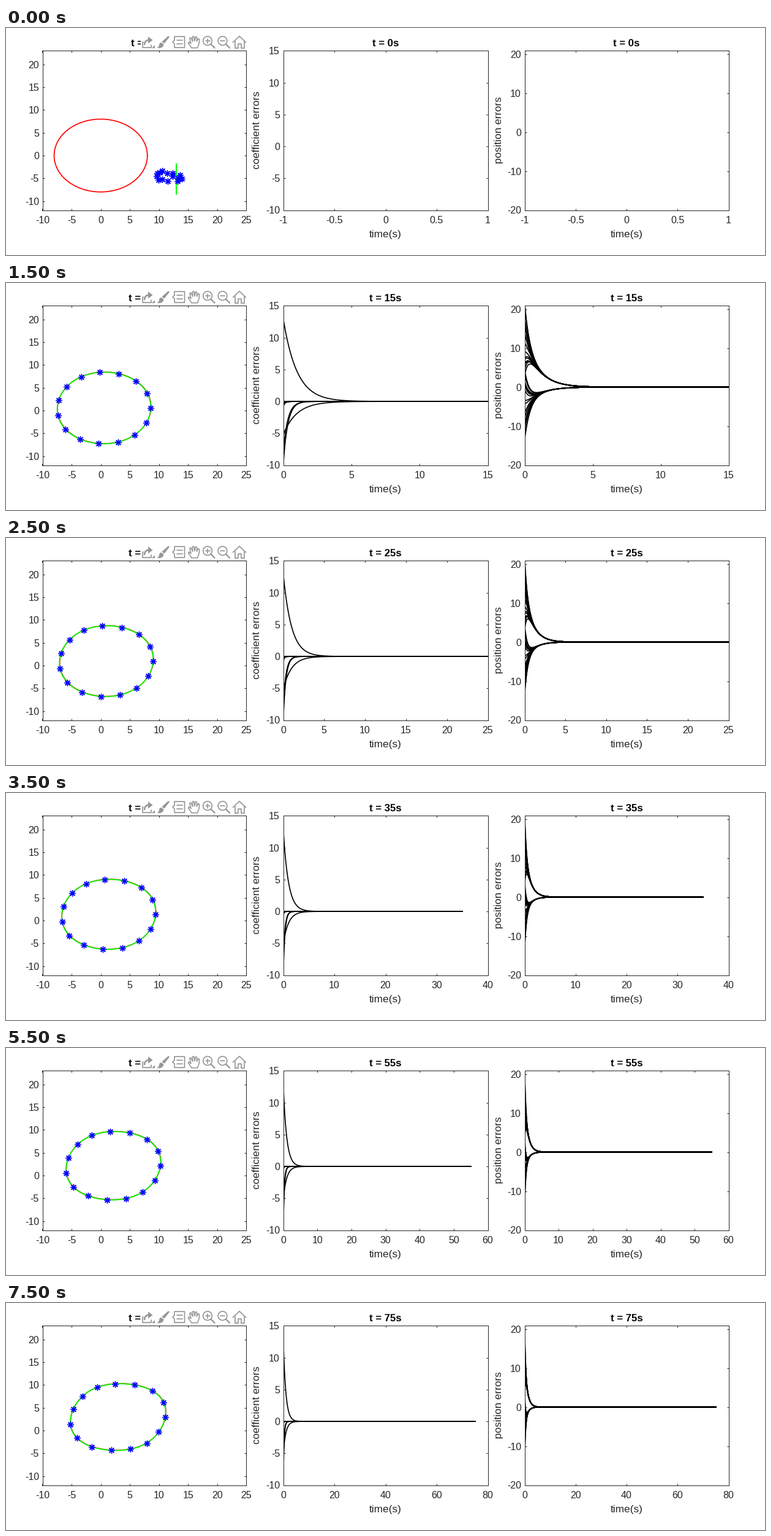
A matplotlib script that plays this animation: 1239 by 372 pixels, repeating every 8 s.

```python
import numpy as np
import matplotlib.pyplot as plt
from matplotlib.animation import FuncAnimation
from matplotlib.patches import Circle, Polygon, Rectangle

W, H, DPI = 1239, 372, 100
PX = 72 / DPI
GREY, INK = "#969696", "#262626"

plt.rcParams.update({
    "font.family": "Liberation Sans",
    "axes.unicode_minus": False,
    "axes.edgecolor": INK,
    "axes.linewidth": 1 * PX,
})

fig = plt.figure(figsize=(W / DPI, H / DPI), dpi=DPI, facecolor="white")


def panel(left, right, ylim, yticks):
    top, bottom = 37.5, 298.5
    ax = fig.add_axes([left / W, 1 - bottom / H, (right - left) / W, (bottom - top) / H])
    ax.patch.set_visible(False)
    ax.set_ylim(ylim)
    ax.set_yticks(yticks)
    ax.tick_params(direction="in", top=True, right=True, length=3.4 * PX,
                   width=1 * PX, color=INK, labelcolor=INK, labelsize=16 * PX)
    ax.tick_params(axis="x", pad=9.5 * PX)
    ax.tick_params(axis="y", pad=5.5 * PX)
    return ax


def set_time_axis(ax, lo, hi, step):
    ticks = np.arange(lo, hi + step / 2, step)
    ax.set_xlim(lo, hi)
    ax.set_xticks(ticks, [f"{v:g}" for v in ticks])


scene = panel(59.5, 392.5, (-12, 23), range(-10, 21, 5))
scene.set_xlim(-10, 25)
scene.set_xticks(range(-10, 26, 5))
coef = panel(452.5, 786.5, (-10, 15), range(-10, 16, 5))
pos = panel(846.5, 1179.5, (-20, 20.8), range(-20, 21, 10))

# Pixel-space layer for labels and the toolbar
ui = fig.add_axes([0, 0, 1, 1], zorder=5)
ui.set_xlim(0, W)
ui.set_ylim(H, 0)
ui.axis("off")


def label(x, y, text, **kw):
    return ui.text(x, y, text, fontsize=17.2 * PX, color=INK, ha="center", **kw)


titles = [ui.text(x, 30, "", fontsize=16.8 * PX, weight="bold", ha="center", zorder=1)
          for x in (226, 619.5, 1013)]
for x in (619.5, 1013):
    label(x, 343, "time(s)", va="baseline")
label(409.5, 167.5, "coefficient errors", rotation=90, va="center")
label(804, 167.5, "position errors", rotation=90, va="center")


def stroke(points, width=1.7):
    x, y = zip(*points)
    ui.plot(x, y, color=GREY, lw=width * PX, zorder=3,
            solid_joinstyle="round", solid_capstyle="round")


def fill(points):
    ui.add_patch(Polygon(points, fc=GREY, ec="none", zorder=3))


def magnifier(x, plus):
    ui.add_patch(Circle((x, 21), 7.3, fc="none", ec=GREY, lw=1.7 * PX, zorder=3))
    stroke([(x + 5.5, 26.5), (x + 11.5, 32.5)], 2.3)
    stroke([(x - 3.5, 21), (x + 3.5, 21)])
    if plus:
        stroke([(x, 17.5), (x, 24.5)])


def toolbar():
    ui.add_patch(Rectangle((220, 11), 173, 25, fc="white", ec="none", zorder=2))
    # export
    stroke([(224, 23), (222.5, 23), (222.5, 32), (236.5, 32), (236.5, 28)])
    stroke([(226, 27), (227, 23), (229.5, 20.5), (233, 19.5)], 2.6)
    fill([(232, 14), (239.5, 19.8), (232, 25.5)])
    fill([(237.5, 32.5), (242.5, 32.5), (242.5, 27.5)])
    # brush
    fill([(265, 13), (267, 14.5), (258.5, 25.5), (254.5, 22.5)])
    fill([(253.5, 23.5), (257.5, 27), (256, 31), (251.5, 33), (246.5, 32.5),
          (249.5, 30), (250.5, 25.5)])
    # data tip
    stroke([(275, 20), (275, 14), (291.5, 14), (291.5, 32), (275, 32), (275, 26),
            (272, 23), (275, 20)])
    for y in (20, 26):
        stroke([(279, y), (288, y)])
    # hand
    stroke([(303, 32.5), (297.5, 24.5), (298.5, 22.8), (302, 25.5), (299.8, 17),
            (301.5, 15.8), (304.8, 22), (304.2, 14.5), (306.5, 13.5), (308, 21.5),
            (309.3, 14.5), (311.5, 14.8), (311.5, 22), (313.8, 17.5), (315.8, 18.5),
            (315, 26), (312.5, 32.5), (303, 32.5)], 1.6)
    magnifier(329, True)
    magnifier(353.5, False)
    # home
    stroke([(370.5, 23.5), (381, 13.5), (391.5, 23.5)])
    stroke([(373.5, 22), (373.5, 32.5), (378.5, 32.5), (378.5, 25.5), (383.5, 25.5),
            (383.5, 32.5), (388.5, 32.5), (388.5, 22)])


toolbar()

ring = np.linspace(0, 2 * np.pi, 241)
theta = np.arange(15) * 2 * np.pi / 15

# Starting places of the agents
start_x = np.array([13.6, 13.25, 12.35, 11.5, 13.15, 12.35, 10.6, 13.6, 13.9, 11.4,
                    9.95, 10.6, 9.7, 9.6, 10.1])
start_y = np.array([-4.35, -4.9, -4.5, -5.65, -5.6, -3.85, -5.2, -5.15, -5.05, -3.85,
                    -5.35, -3.3, -3.95, -4.6, -3.7])

DRIFT, SHAPE_RATE, AGENT_RATE = 0.04, 3.0, 4.0


def goal(t, a):
    """Drifting circle that slowly skews."""
    s = t / 75
    bump = 0.2 * s * np.sin(3 * a)
    x = DRIFT * t + (8 + 0.1 * s) * np.cos(a) + 0.53 * s * np.sin(a) + bump
    y = DRIFT * t + (8 - 0.47 * s) * np.sin(a) + bump
    return x, y


def estimate_error(t, a):
    slow, fast = np.exp(-t), np.exp(-SHAPE_RATE * t)
    lag = DRIFT * (1 - slow)
    ex = 13 * slow - 8 * fast * np.cos(a) - lag
    ey = -5.2 * slow + fast * (1.3 * np.sin(3 * a) - 10 * np.sin(a)) - lag
    return ex, ey


def agent_error(t, a, x0, y0):
    gx, gy = goal(0, a)
    ex0, ey0 = estimate_error(0, a)
    ex, ey = estimate_error(t, a)
    k = np.exp(-AGENT_RATE * t)
    return ex + (x0 - gx - ex0) * k, ey + (y0 - gy - ey0) * k


coef_terms = [(13, 1), (-5.2, 1), (-8, SHAPE_RATE), (-10, SHAPE_RATE),
              (-0.85, 8), (-0.5, 6), (-0.3, 5), (0, 1)]

red, = scene.plot([], [], color="red", lw=1.7 * PX)
green, = scene.plot([], [], color="lime", lw=1.8 * PX)
stars, = scene.plot([], [], ls="none", marker=(8, 2, 0), ms=10.5 * PX,
                    mec="blue", mew=1.4 * PX)
coef_lines = [coef.plot([], [], color="black", lw=1.7 * PX)[0] for _ in coef_terms]
pos_lines = [pos.plot([], [], color="black", lw=1.7 * PX)[0] for _ in range(30)]


def time_range(t):
    if t == 0:
        return -1, 1, 0.5
    step = next(s for s in (1, 2, 5, 10, 20) if t <= 6 * s)
    return 0, np.ceil(t / step) * step, step


def draw(i):
    t = 5 * i
    for title in titles:
        title.set_text(f"t = {t}s")

    red.set_data(*goal(t, ring))
    green.set_data(*np.add(goal(t, ring), estimate_error(t, ring)))
    stars.set_data(*np.add(goal(t, theta), agent_error(t, theta, start_x, start_y)))

    for ax in (coef, pos):
        set_time_axis(ax, *time_range(t))
    past = t * np.linspace(0, 1, 500) ** 2 if t else np.array([])
    for line, (size, rate) in zip(coef_lines, coef_terms):
        line.set_data(past, size * np.exp(-rate * past))
    for n, (a, x0, y0) in enumerate(zip(theta, start_x, start_y)):
        ex, ey = agent_error(past, a, x0, y0)
        pos_lines[2 * n].set_data(past, ex + DRIFT * (1 - np.exp(-past)))
        pos_lines[2 * n + 1].set_data(past, ey + DRIFT * (1 - np.exp(-past)))
    return []


anim = FuncAnimation(fig, draw, frames=16, interval=500, repeat=True, repeat_delay=0)
plt.show()
```
